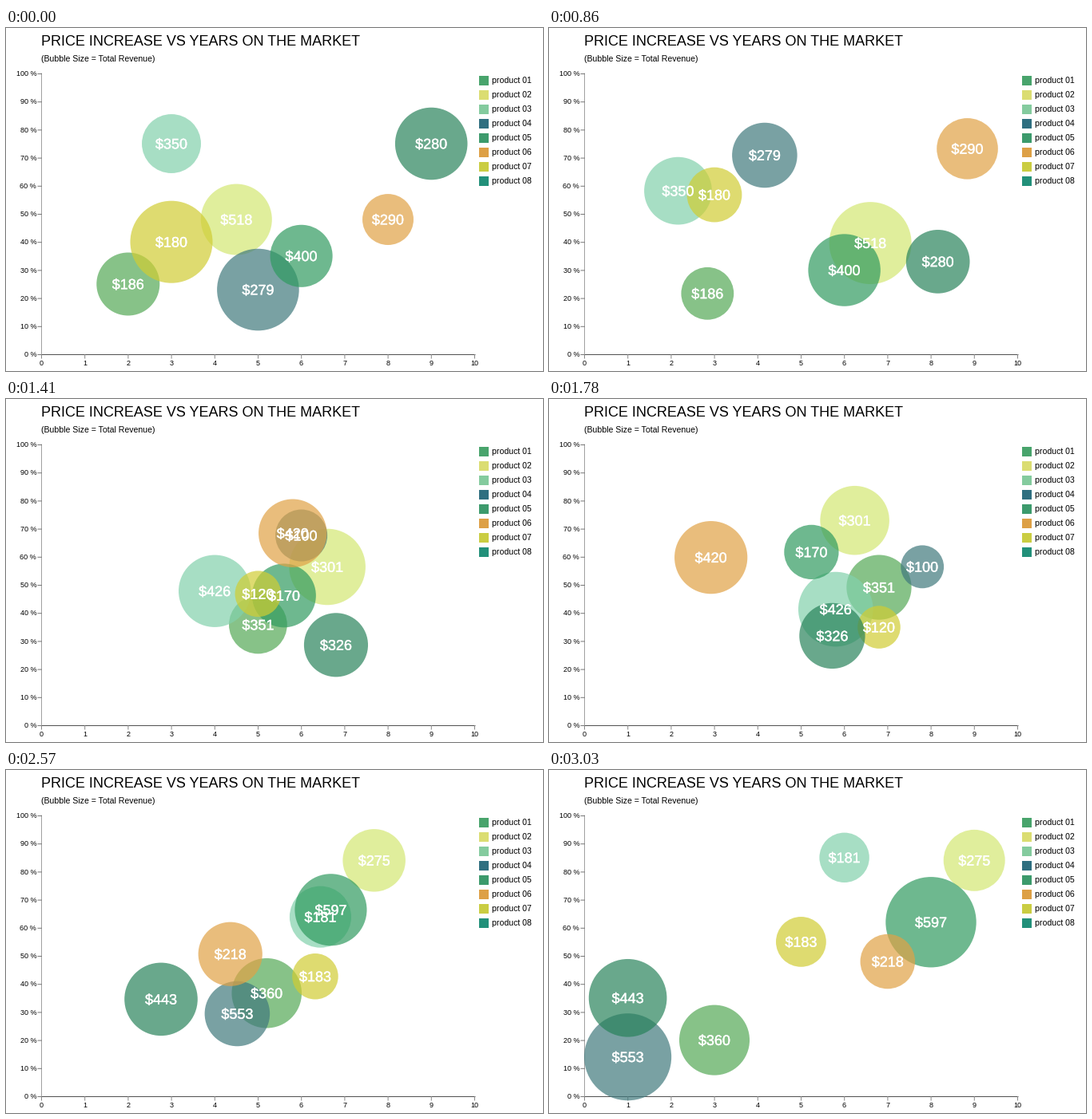
A matplotlib script for the animation above (3640 ms loop, 672 by 430 pixels).

```python
import numpy as np
import matplotlib.pyplot as plt
from matplotlib.animation import FuncAnimation
from matplotlib.patches import Circle, Polygon, Rectangle
from matplotlib.patheffects import withStroke

W, H, DPI = 672, 430, 100
PX = 72 / DPI               # points per pixel
LOOP, STEP = 3640, 20
TICK = 77.6                 # ms between visible moves
MOVES = 39                  # visible moves in three transitions
FPS = 25                    # chart steps per one-second transition
X0, Y0, XU, YU = 44.4, 409, 54.2, 3.52

plt.rcParams["font.family"] = "Liberation Sans"

# legend colour, bubble colour, then (years, percent, revenue) per state
PRODUCTS = [
    ("#48a46c", "#54a856", (2, 25, 290), (3, 21, 186), (8, 58, 351), (3, 20, 360)),
    ("#dbdd72", "#d4e773", (4.5, 48, 368), (7, 38, 518), (6, 84, 301), (9, 84, 275)),
    ("#84cb9e", "#82d1ac", (3, 75, 254), (2, 55, 350), (7, 37, 426), (6, 85, 181)),
    ("#2f6f80", "#40797d", (5, 23, 489), (4, 80, 279), (9, 49, 100), (1, 14, 553)),
    ("#3c9a6c", "#309b60", (6, 35, 283), (6, 29, 400), (5, 72, 170), (8, 62, 597)),
    ("#dda046", "#e1a245", (8, 48, 190), (9, 78, 290), (1, 54, 420), (7, 48, 218)),
    ("#cacd42", "#d0cd33", (3, 40, 493), (3, 60, 180), (8, 27, 120), (5, 55, 183)),
    ("#22907a", "#29835b", (9, 75, 381), (8, 25, 280), (5, 34, 326), (1, 35, 443)),
]
POINTER = np.array([(0, 0), (0, 16), (3.8, 12.6), (6.4, 18.8),
                    (9, 17.7), (6.4, 11.6), (11.3, 11.6)])

fig = plt.figure(figsize=(W / DPI, H / DPI), dpi=DPI, facecolor="white")
ax = fig.add_axes([0, 0, 1, 1])
ax.set(xlim=(0, W), ylim=(H, 0))
ax.axis("off")


def label(x, y, text, size, color="black", **kw):
    """Text whose capitals are centred on y; size in pixels."""
    return ax.text(x, y + 0.36 * size, text, fontsize=size * PX,
                   color=color, va="baseline", **kw)


def line(xs, ys, color):
    ax.plot(xs, ys, color=color, lw=PX, snap=False, zorder=1)


def draw_static():
    label(44.3, 15.8, "PRICE INCREASE VS YEARS ON THE MARKET", 18)
    label(44, 38.3, "(Bubble Size = Total Revenue)", 10.5)

    line([44.5, 44.5], [57, 409], "#a0a0a0")
    line([44, 587], [409.5, 409.5], "#505050")
    for k in range(11):
        y = 409.5 - 10 * YU * k
        line([40, 44.5], [y, y], "#777777")
        label(38.2, y - 0.6, f"{10 * k} %", 9, ha="right")
        x = 44.5 + XU * k
        line([x, x], [409.5, 414], "#888888")
        label(x - 0.3, 419.7, str(k), 9, ha="center")

    for k, (color, *_) in enumerate(PRODUCTS):
        y = 65.5 + 18 * k
        ax.add_patch(Rectangle((592, y - 5.5), 12, 12, fc=color, lw=0))
        label(608, y, f"product {k + 1:02d}", 10.5)


def bubble_points(states):
    """Turn data states into centre and radius in pixels."""
    years, percent, revenue = np.array(states, float).T
    return np.column_stack([X0 + XU * years, Y0 - YU * percent,
                            2.32 * np.sqrt(revenue)])


draw_static()
bubbles = []
for _, color, *states in PRODUCTS:
    disc = ax.add_patch(Circle((0, 0), 1, fc=color, alpha=0.7, lw=0, zorder=4))
    tag = label(0, 0, "", 18, "white", ha="center", zorder=5,
                path_effects=[withStroke(linewidth=0.35 * PX,
                                         foreground="white")])
    bubbles.append((disc, tag, states, bubble_points(states)))
pointer = ax.add_patch(Polygon(POINTER, fc="white", ec="#24382c", lw=PX,
                               zorder=6))


def update(i):
    n = min(int(i * STEP / TICK + 0.21), MOVES)
    step = int(n * 3 * FPS / MOVES + 0.55)
    phase = min(step // FPS, 2)
    e = step / FPS - phase
    for disc, tag, states, points in bubbles:
        x, y, r = points[phase] + (points[phase + 1] - points[phase]) * e
        disc.center = x, y
        disc.radius = r
        tag.set_position((x, y + 6.3))
        tag.set_text(rf"\${states[phase + 1][2]}")

    # the mouse pointer sweeps in from below and leaves to the left
    k = n - 6
    pointer.set_visible(-1 <= k <= 2)
    pointer.set_xy(POINTER + (52 - 6.5 * k * k, 330 + 4.5 * 16.0 ** -k))


anim = FuncAnimation(fig, update, frames=LOOP // STEP, interval=STEP,
                     repeat=True, repeat_delay=0, blit=False)
plt.show()
```
